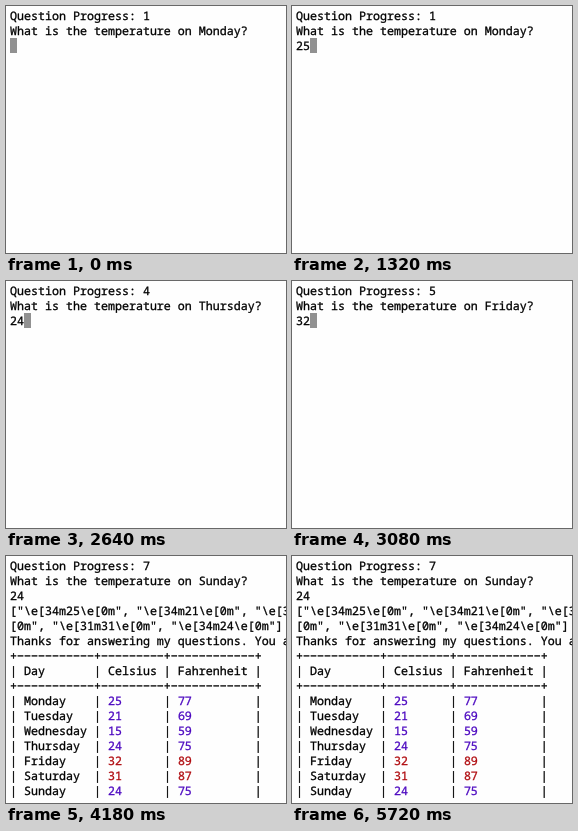
These frames come from a looping animation (280x247 px, 5940 ms). An HTML page:

```html
<!DOCTYPE html>
<html lang="en">
<head>
<meta charset="utf-8">
<title>Temperature quiz</title>
<style>
  html, body { margin: 0; width: 100%; height: 100%; overflow: hidden; background: #fefefe; }
  svg { display: block; }
  text {
    font: 11.667px "Noto Sans Mono", "DejaVu Sans Mono", monospace;
    fill: #000; stroke: #000; stroke-width: .3px;
    white-space: pre; text-rendering: geometricPrecision;
  }
  .cool { fill: #4c08c0; stroke: #4c08c0; }
  .warm { fill: #b00c10; stroke: #b00c10; }
</style>
</head>
<body>
<svg id="stage" width="280" height="247" viewBox="0 0 280 247">
  <rect width="280" height="247" fill="#fefefe"/>
  <rect id="cursor" y="32" width="7" height="15" fill="#919191"/>
</svg>
<script>
const LOOP = 5940, LEFT = 4, BASELINE = 13.75, CELL = 7, LINE = 15;
const svg = document.getElementById("stage");
const cursor = document.getElementById("cursor");
const days = ["Monday", "Tuesday", "Wednesday", "Thursday", "Friday", "Saturday", "Sunday"];
const temps = [25, 21, 15, 24, 32, 31, 24];

// start time, day index, typed digits
const steps = [
  [0, 0, 0], [880, 0, 1], [1320, 0, 2], [1540, 1, 1],
  [1760, 2, 0], [1980, 2, 2], [2200, 3, 0], [2640, 3, 2],
  [2860, 4, 0], [3080, 4, 2], [3300, 5, 0], [3520, 5, 2],
  [3740, 6, 1], [3960, 6, 2]
];
const RESULT_AT = 4180;

function make(name, attrs, parent) {
  const node = document.createElementNS("http://www.w3.org/2000/svg", name);
  for (const key in attrs) node.setAttribute(key, attrs[key]);
  return parent.appendChild(node);
}

function addLine(row, content, parent) {
  const line = make("text", { x: LEFT, y: BASELINE + row * LINE, "xml:space": "preserve" }, parent);
  line.textContent = content;
  return line;
}

const isWarm = t => t > 30;
const escaped = temps.map(t => `"\\e[${isWarm(t) ? 31 : 34}m${t}\\e[0m"`);
const dump = `[${escaped.join(", ")}]`;

const prompt = [0, 1, 2].map(row => addLine(row, "", svg));
const result = make("g", {}, svg);
const rule = "+" + [11, 9, 12].map(n => "\u2212".repeat(n)).join("+") + "+";

[
  dump.slice(0, 80),
  dump.slice(80),
  "Thanks for answering my questions. You are done!",
  rule,
  "| Day       | Celsius | Fahrenheit |",
  rule
].forEach((content, i) => addLine(3 + i, content, result));

days.forEach((day, i) => {
  const line = addLine(9 + i, "", result);
  const span = (content, style = "") => {
    make("tspan", { class: style }, line).textContent = content;
  };
  const style = isWarm(temps[i]) ? "warm" : "cool";
  span(`| ${day.padEnd(9)} | `);
  span(String(temps[i]).padEnd(7), style);
  span(" | ");
  span(String(Math.floor(temps[i] * 9 / 5 + 32)).padEnd(10), style);
  span(" |");
});
addLine(9 + days.length, rule, result);

function render(time) {
  const [, day, typed] = steps.filter(step => step[0] <= time).pop();
  const done = time >= RESULT_AT;
  prompt[0].textContent = `Question Progress: ${day + 1}`;
  prompt[1].textContent = `What is the temperature on ${days[day]}?`;
  prompt[2].textContent = String(temps[day]).slice(0, typed);
  cursor.setAttribute("x", LEFT + typed * CELL);
  cursor.style.display = done ? "none" : "";
  result.style.display = done ? "" : "none";
}

const start = performance.now();
function tick() {
  render((performance.now() - start) % LOOP);
  requestAnimationFrame(tick);
}
tick();
</script>
</body>
</html>
```
